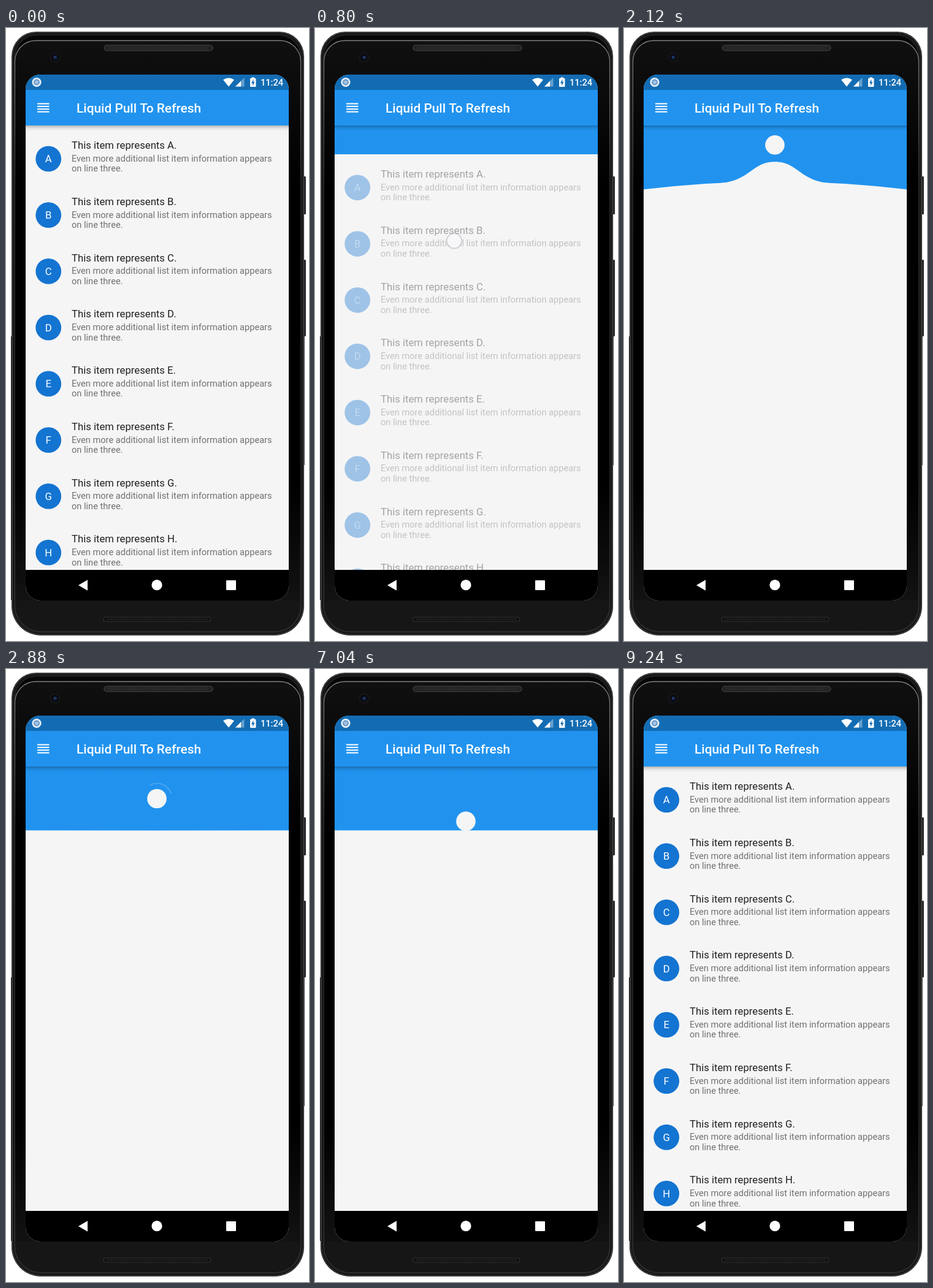
An HTML page with a canvas that plays this animation: 494 px wide and 1000 px high, repeating every 9.28 s.

```html
<!DOCTYPE html>
<html lang="en">
<head>
<meta charset="utf-8">
<title>Pull to refresh</title>
<style>
  html, body { margin: 0; width: 100%; height: 100%; overflow: hidden; background: #fff; }
  canvas { display: block; }
</style>
</head>
<body>
<canvas id="stage" width="494" height="1000"></canvas>
<script>
const c = document.getElementById('stage').getContext('2d');
const LOOP = 9280, BLUE = '#2193ef', PAPER = '#f5f5f5';
const LEFT = 32, RIGHT = 461, MID = 246, TOP = 159, BOTTOM = 884, BOX = 104.3;
const REST_Y = 211.3, RELEASE = 1960, CLOSE = 7480;
const clamp = (v, a = 0, b = 1) => Math.min(b, Math.max(a, v));
const span = (t, a, b) => clamp((t - a) / (b - a));

function box(x, y, w, h, r, fill, stroke, line = 1) {
  c.beginPath();
  c.roundRect(x, y, w, h, r);
  if (fill) { c.fillStyle = fill; c.fill(); }
  if (stroke) { c.strokeStyle = stroke; c.lineWidth = line; c.stroke(); }
}
function dot(x, y, r, fill) {
  c.beginPath();
  c.arc(x, y, r, 0, 7);
  c.fillStyle = fill;
  c.fill();
}
function poly(fill, ...p) {
  c.beginPath();
  for (let i = 0; i < p.length; i += 2) c.lineTo(p[i], p[i + 1]);
  c.fillStyle = fill;
  c.fill();
}
function text(s, x, y, size, fill, weight = 400, align = 'left') {
  c.font = `${weight} ${size}px Roboto, sans-serif`;
  c.textAlign = align;
  c.fillStyle = fill;
  c.fillText(s, x, y);
}
function fade(x0, y0, x1, y1, ...stops) {
  const g = c.createLinearGradient(x0, y0, x1, y1);
  stops.forEach((s, i) => g.addColorStop(i / (stops.length - 1), s));
  return g;
}

function speaker(x, y, w, h, rim, fill) {
  box(x, y, w, h, h / 2, fill, rim, 1.2);
  c.setLineDash([1, 2]);
  c.beginPath();
  c.moveTo(x + 6, y + h / 2);
  c.lineTo(x + w - 6, y + h / 2);
  c.lineWidth = h - 4;
  c.strokeStyle = '#303030';
  c.stroke();
  c.setLineDash([]);
}

function phone() {
  const corners = r => [r, r, r + 8, r + 8];
  c.fillStyle = '#fff';
  c.fillRect(0, 0, 494, 1000);
  for (const [y, h] of [[242, 62], [378, 125]]) box(484, y, 5, h, 1.5, '#2e2e2e');
  box(8, 503, 10, 430, 0, '#292929');
  box(476, 503, 10.7, 210, 0, '#292929');
  box(9, 6, 477, 985, corners(40), '#2b2b2b');
  box(10.5, 7.5, 474, 982, corners(39), '#101010', '#4a4745', 1);
  box(14, 11, 467, 975, corners(36), '#060606', '#1e1e1e', 3);
  box(14.5, 20.5, 466, 964, corners(34), fade(0, 20, 0, 985, '#101010', '#000', '#000', '#000', '#171717'),
    fade(0, 20, 0, 985, '#85827e', '#262626', '#222', '#222', '#343434'), 1.3);
  box(16, 934, 463, 50, [0, 0, 40, 40], '#161616');
  speaker(160, 28, 177, 9, '#444', '#222');
  speaker(159, 961, 175, 7, '#303030', '#111');
  dot(80, 48, 8.5, '#17171a');
  dot(80, 48, 6.5, '#0a0b11');
  dot(80.5, 48, 3, '#14264a');
  dot(79.5, 47.5, 1.1, '#3a5c94');
}

function list(shift) {
  c.globalAlpha = clamp(1 - 1.37 * shift / BOX);
  if (!c.globalAlpha) return c.globalAlpha = 1;
  [...'ABCDEFGH'].forEach((letter, i) => {
    const y = 213.4 + shift + i * 91.75;
    dot(69.2, y, 20.9, '#1474d1');
    text(letter, 69.2, y + 5.9, 16.7, '#fff', 400, 'center');
    text(`This item represents ${letter}.`, 107, y - 16.2, 16.7, 'rgba(0,0,0,.87)');
    text('Even more additional list item information appears', 107, y + 4.4, 14.6, 'rgba(0,0,0,.54)');
    text('on line three.', 107, y + 21, 14.6, 'rgba(0,0,0,.54)');
  });
  c.globalAlpha = 1;
}

function curtain(height, bulge) {
  const y = TOP + height;
  c.beginPath();
  c.moveTo(LEFT, TOP);
  c.lineTo(LEFT, y);
  c.quadraticCurveTo(MID, y + 2 * bulge, RIGHT, y);
  c.lineTo(RIGHT, TOP);
  c.fillStyle = BLUE;
  c.fill();
}

// Paper-coloured hill that lifts the indicator out of the page
function hill(y, height) {
  c.beginPath();
  c.moveTo(MID - 100, y + 3);
  c.bezierCurveTo(MID - 40, y + 3, MID - 40, y - height, MID, y - height);
  c.bezierCurveTo(MID + 40, y - height, MID + 40, y + 3, MID + 100, y + 3);
  c.fillStyle = PAPER;
  c.fill();
}

function ring(t) {
  const show = span(t, 2780, 3340) * (1 - span(t, 5820, 6360));
  if (!show) return;
  const p = ((t - 2860) / 1130) % 1;
  const sweep = 0.25 + (5 / 6 - 0.25) * (1 - Math.abs(2 * p - 1));
  const start = Math.PI * (-2 / 3 + 7 / 6 * span(p, 0.5, 1) + 5 / 6 * p);
  c.globalAlpha = show;
  c.beginPath();
  c.arc(MID, REST_Y, 20.5 * (1.25 - 0.25 * show), start, start + sweep * 2 * Math.PI);
  c.lineWidth = 2;
  c.strokeStyle = PAPER;
  c.stroke();
  c.globalAlpha = 1;
}

function fingerY(t) {
  return 233 + 114 * span(t, 480, 800) + 146 * span(t, 800, 1200) + 135 * span(t, 1200, 1700);
}

function finger(t) {
  c.globalAlpha = span(t, 400, 480) * (1 - span(t, RELEASE, RELEASE + 80));
  if (c.globalAlpha) {
    const x = 227 - (t - 800) / 100, y = fingerY(t);
    dot(x, y, 13.5, 'rgba(130,130,140,.12)');
    dot(x, y, 12, 'rgba(252,252,254,.85)');
    c.lineWidth = 1.5;
    c.strokeStyle = 'rgba(150,150,165,.35)';
    c.stroke();
  }
  c.globalAlpha = 1;
}

function header() {
  c.fillStyle = fade(0, TOP, 0, TOP + 9, 'rgba(0,0,0,.26)', 'rgba(0,0,0,.08)', 'rgba(0,0,0,0)');
  c.fillRect(LEFT, TOP, RIGHT - LEFT, 9);
  c.fillStyle = BLUE;
  c.fillRect(LEFT, 76, RIGHT - LEFT, TOP - 76);
  c.fillStyle = '#136cb3';
  c.fillRect(LEFT, 76, RIGHT - LEFT, 25);
  c.fillStyle = '#fff';
  for (let i = 0; i < 4; i++) c.fillRect(51, 122.5 + i * 4.4, 19.5, 2);
  text('Liquid Pull To Refresh', 115, 137.5, 20.86, '#fff', 500);

  dot(50, 88.5, 7.6, '#e9f0f8');
  dot(50, 88.5, 5, '#6d9dcc');
  dot(50, 88.5, 2.8, '#a5c3e2');
  c.beginPath();
  c.moveTo(363, 95.5);
  c.lineTo(354, 84.5);
  c.quadraticCurveTo(363, 78.5, 372, 84.5);
  c.fillStyle = '#fff';
  c.fill();
  poly('rgba(255,255,255,.35)', 374, 95.5, 388.5, 95.5, 388.5, 81);
  poly('#fff', 374, 95.5, 383, 95.5, 383, 86.5);
  box(398, 82, 9.5, 14, 1, '#fff');
  c.fillRect(400.5, 80.5, 4.5, 2);
  poly('#136cb3', 403.5, 83.5, 400, 90, 402.3, 90, 402, 94.5, 405.5, 88, 403.3, 88);
  text('11:24', 415, 94, 14.6, '#fff', 500);
}

function navBar() {
  c.fillStyle = '#000';
  c.fillRect(LEFT, BOTTOM, RIGHT - LEFT, 52);
  poly('#fff', 118, 909, 133, 900.3, 133, 917.7);
  dot(MID, 908.7, 8.6, '#fff');
  box(359, 901, 16, 16, 1, '#fff');
}

function draw(t) {
  const u = (t - RELEASE) / 900;
  const swing = Math.exp(-6 * u) * Math.cos(12 * u);
  const pull = 0.41 * (fingerY(t) - 233);
  const height = Math.min(pull, BOX) * (1 - span(t, CLOSE - 20, 8240));
  const bulge = u < 0 ? 1.2 * Math.max(0, pull - BOX) : t < 3840 ? 1.2 * (pull - BOX) * swing : 0;

  phone();
  c.save();
  c.beginPath();
  c.roundRect(LEFT, 76, RIGHT - LEFT, 858, 24);
  c.clip();
  c.fillStyle = PAPER;
  c.fillRect(LEFT, 76, RIGHT - LEFT, 858);
  list(height);
  curtain(height, bulge);
  if (u >= 0 && t < CLOSE) {
    if (u < 0.6) hill(TOP + BOX + bulge, 40 * Math.sin(Math.PI * u / 0.6));
    const sink = 68 * span(t, 6490, 7500);
    dot(MID, REST_Y + 110 * swing * (t < 3840) + sink, 15.8, PAPER);
    ring(t);
  }
  header();
  finger(t);
  navBar();
  c.restore();
}

const begin = performance.now();
function tick() {
  draw((performance.now() - begin) % LOOP);
  requestAnimationFrame(tick);
}
tick();
</script>
</body>
</html>
```
